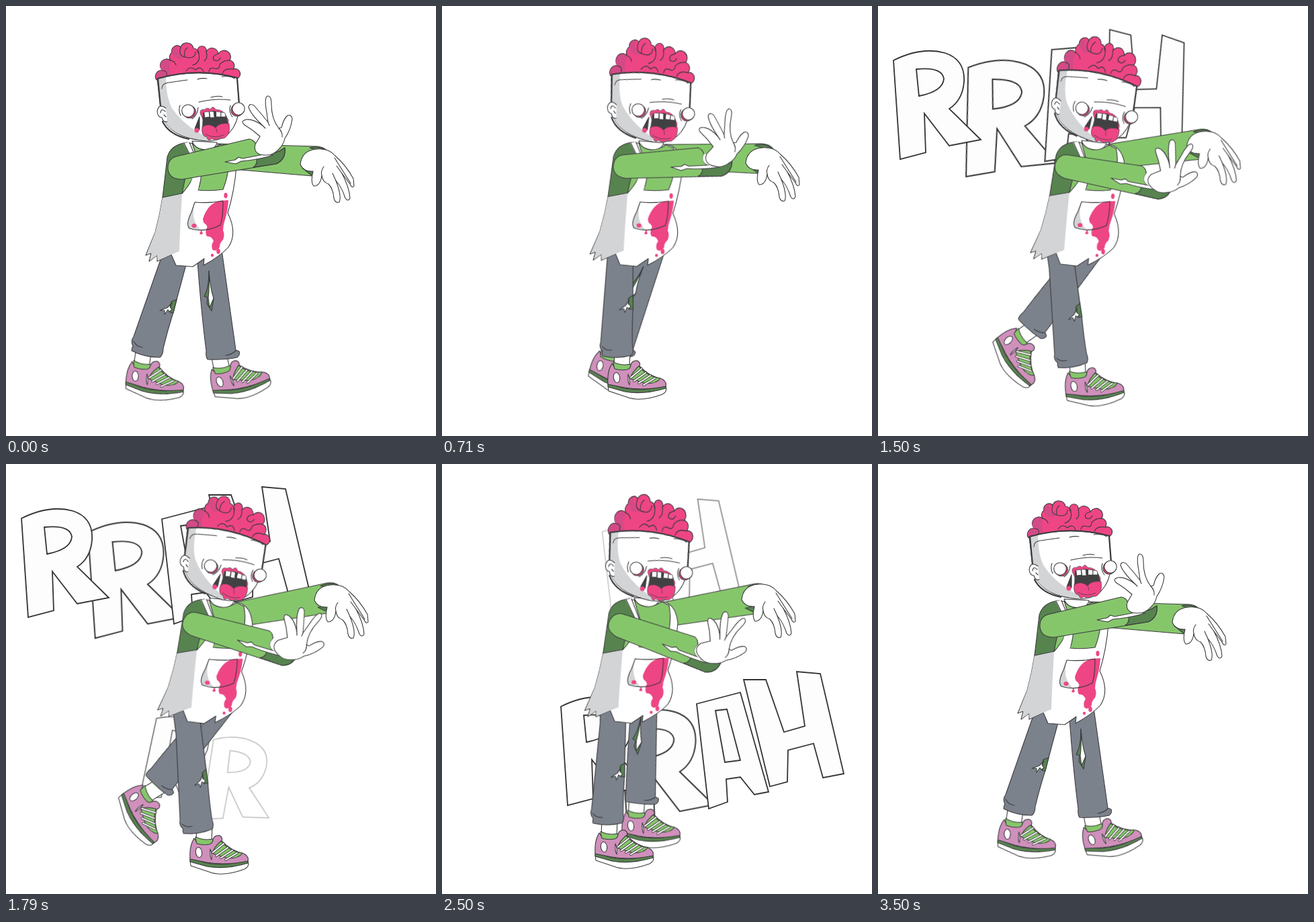
Write an HTML page without scripts that moves like this. It is 640 px wide and 640 px high and loops after 3.57 s.

```html
<!DOCTYPE html>
<html lang="en">
<head>
<meta charset="utf-8">
<title>Walking zombie</title>
<style>
html, body { margin: 0; height: 100%; overflow: hidden; background: #fff; }
svg { display: block; width: 100vw; height: 100vh; }
svg { fill: none; stroke: #3b3b3d; stroke-width: 1.1; stroke-linejoin: round; stroke-linecap: round; }
.white { fill: #fff; }
.green { fill: #86c66b; }
.moss { fill: #57834f; }
.slate { fill: #7c828c; }
.shade { fill: #d2d4d6; }
.pink { fill: #ee4585; }
.rose { fill: #d24a86; }
.lilac { fill: #cf90bb; }
.dark { fill: #414143; }
.flat { stroke: none; }

/* Each part holds six poses, a to f; one cycle walks through them at 14 fps. */
.p { transform: var(--a); transform-origin: var(--o, 0 0); animation: walk 3.57s -5ms infinite; --a: translate(0, 0) rotate(0deg); }
@keyframes walk {
  0% { transform: var(--a); animation-timing-function: steps(10); }
  20% { transform: var(--b); animation-timing-function: steps(6); }
  32% { transform: var(--c); animation-timing-function: steps(9); }
  50% { transform: var(--d); animation-timing-function: steps(10); }
  70% { transform: var(--e); animation-timing-function: steps(8); }
  86% { transform: var(--f); animation-timing-function: steps(6); }
  98%, 100% { transform: var(--a); }
}
#torso { --o: 250px 385px;
  --b: translate(12px, -1px) rotate(1.2deg); --c: translate(20px, -1px) rotate(2deg);
  --d: translate(17px, -3px) rotate(2.7deg); --e: translate(4px, -3px) rotate(1.6deg);
  --f: translate(0, 0) rotate(0deg); }
#head { --o: 308px 154px;
  --b: translate(21px, 3px) rotate(6.7deg); --c: translate(31px, 4px) rotate(11.3deg);
  --d: translate(33px, 4px) rotate(12.8deg); --e: translate(18px, 4px) rotate(7.4deg);
  --f: translate(1px, 1px) rotate(.4deg); }
#brain { --o: 285px 108px; --a: scale(1, 1);
  --b: scale(1, 1.12); --c: scale(1, 1.2); --d: scale(1, 1.09); --e: scale(1, 1.18); --f: scale(1, 1.12); }
#arm { --o: 257px 241px;
  --b: translate(14px, -2px) rotate(8deg); --c: translate(23px, -1px) rotate(14.8deg);
  --d: translate(22px, -3px) rotate(27.5deg); --e: translate(7px, -1px) rotate(31deg);
  --f: translate(0, 0) rotate(9deg); }
#hand { --o: 390px 212px;
  --b: translate(5px, 0) rotate(4deg); --c: translate(6px, 3px) rotate(18deg);
  --d: translate(7px, 3px) rotate(16deg); --e: translate(2px, 0) rotate(15deg);
  --f: translate(1px, 0) rotate(1deg); }
#farArm { --o: 320px 226px;
  --b: translate(14px, 1px) rotate(-2deg); --c: translate(22px, 1px) rotate(-7.5deg);
  --d: translate(23px, 1px) rotate(-13.5deg); --e: translate(10px, 1px) rotate(-13deg);
  --f: translate(0, 1px) rotate(-5deg); }
#farHand {
  --b: translate(14px, -2px) rotate(0deg); --c: translate(22px, -18px) rotate(0deg);
  --d: translate(21px, -33px) rotate(0deg); --e: translate(8px, -34px) rotate(0deg);
  --f: translate(0, -13px) rotate(0deg); }
#leg { --o: 210px 517px;
  --b: translate(52px, 2px) rotate(-14.8deg); --c: translate(86px, 1px) rotate(-24deg);
  --d: translate(77px, 28px) rotate(-22deg); --e: translate(38px, 16px) rotate(-13.6deg);
  --f: translate(23px, 7px) rotate(-8.5deg); }
#farLeg { --o: 322px 517px;
  --b: translate(-58px, -10px) rotate(26deg); --c: translate(-90px, -39px) rotate(43deg);
  --d: translate(-92px, -44px) rotate(46deg); --e: translate(-25px, -20px) rotate(9deg);
  --f: translate(16px, -22px) rotate(-6deg); }
#foot { --a: translate(222px, 557px) rotate(6deg);
  --b: translate(290px, 556px) rotate(0deg); --c: translate(328px, 548px) rotate(-12deg);
  --d: translate(317px, 581px) rotate(0deg); --e: translate(271px, 573px) rotate(0deg);
  --f: translate(251px, 563px) rotate(0deg); }
#farFoot { --a: translate(348px, 555px) rotate(-14deg);
  --b: translate(263px, 547px) rotate(17deg); --c: translate(216px, 525px) rotate(48deg);
  --d: translate(205px, 522px) rotate(56deg); --e: translate(311px, 542px) rotate(1deg);
  --f: translate(367px, 531px) rotate(-9deg); }

/* Letters pop in one after another, settle, shrink and fade. */
.l { fill: #fdfdfd; stroke: #333; stroke-width: 1.8; stroke-linejoin: miter; opacity: 0;
  transform-box: fill-box; transform-origin: 50% 100%;
  animation: shout 3.57s calc(var(--t) * 1ms + var(--i) * 70ms) linear infinite backwards; }
@keyframes shout {
  0% { opacity: 0; transform: rotate(10deg) scale(.72); }
  4% { opacity: .9; transform: rotate(17deg) scale(.83); }
  6.2% { opacity: 1; transform: rotate(13deg) scale(1.08); }
  11.2%, 25% { opacity: 1; transform: rotate(0deg) scale(1); }
  31% { opacity: 1; transform: rotate(0deg) scale(.91); }
  36.8%, 100% { opacity: 0; transform: rotate(0deg) scale(.87); }
}
</style>
</head>
<body>
<svg viewBox="0 0 640 640" role="img" aria-label="A zombie walks and shouts RRAH">
<defs>
  <path id="r" d="M0,0q42,-21 77,-11q30,10 28,43q-2,27 -22,40l47,46 -47,9 -37,-48 2,58 -38,10zM34,13q38,-4 41,14q-1,19 -37,26z"/>
  <path id="ltrA" d="M379,357L444,340 486,488 465,492 444,466 423,469 425,503 397,513ZM407,367L424,365 444,441 421,444Z"/>
  <path id="ltrH" d="M449,321L482,321 509,399 540,390 528,309 563,312 598,461 567,467 553,416 515,426 514,473 488,480Z"/>
  <g id="shoe">
    <path class="white" d="M-33,-46L-34,-20 -11,-18 -10,-44"/>
    <path class="green" d="M-35,-26Q-22,-20 -10,-23L-8,-12 -33,-12Z"/>
    <path class="white" d="M-43,8L-18,12Q10,17 43,10Q46,18 38,22Q5,34 -15,26L-42,17Z"/>
    <path class="moss" d="M-43,6L-18,13Q10,18 43,9L43,13Q10,23 -18,18L-43,11Z"/>
    <path class="lilac" d="M-37,-24Q-34,-21 -33,-16Q-24,-13 -14,-15Q-9,-17 -9,-22Q-7,-29 1,-28Q6,-25 4,-20Q18,-5 37,-1Q45,3 43,10Q10,17 -18,12L-43,7Q-44,-8 -40,-18Z"/>
    <path class="green" d="M3,-20Q14,-5 35,-2Q30,6 14,6L-9,-1Q-10,-8 3,-20Z"/>
    <path stroke-width="3.6" d="M-9,-3L7,-16M-4,2L13,-10M3,5L20,-6M10,8L27,-2"/>
    <path stroke="#fff" stroke-width="2" d="M-9,-3L7,-16M-4,2L13,-10M3,5L20,-6M10,8L27,-2"/>
    <ellipse class="white" cx="-30" cy="-3" rx="4.6" ry="7.6" transform="rotate(-8 -30 -3)"/>
    <path class="white" d="M-13,-8Q-10,-1 -11,8Q-14,3 -13,-8Z"/>
  </g>
</defs>

<g style="--t:1100">
  <g transform="translate(122 102) scale(1.07)"><use href="#r" class="l" style="--i:1"/></g>
  <g transform="translate(23 81)"><use href="#r" class="l" style="--i:0"/></g>
  <g transform="translate(-147 -275)">
    <use href="#ltrA" class="l" style="--i:2"/>
    <use href="#ltrH" class="l" style="--i:3"/>
  </g>
</g>
<g style="--t:1670">
  <g transform="translate(265 381) scale(1.07)"><use href="#r" class="l" style="--i:1"/></g>
  <g transform="translate(177 361)"><use href="#r" class="l" style="--i:0"/></g>
  <use href="#ltrA" class="l" style="--i:2"/>
  <use href="#ltrH" class="l" style="--i:3"/>
</g>

<g id="farArm" class="p">
  <path class="green" d="M315,205L464,209Q474,210 479,217L456,253 315,241Z"/>
  <path class="moss" d="M452,211Q468,207 479,217L466,216ZM441,241L456,253 458,241Z"/>
</g>
<g id="farHand" class="p">
  <path class="white" d="M438,236Q440,215 462,213Q480,211 490,223Q506,237 517,257L518,268Q515,272 512,265L500,249Q511,270 512,286Q509,292 505,286Q500,270 491,260Q500,283 496,292Q490,294 488,286Q487,272 480,265Q471,262 470,252Q468,268 458,268Q453,262 457,246Q443,247 438,236Z"/>
  <path d="M470,252Q468,246 473,239M491,260L486,249M500,249L492,238M513,264L489,226"/>
</g>

<use id="farFoot" class="p" href="#shoe"/>
<g id="farLeg" class="p">
  <path class="slate" d="M284,342L285,380Q291,460 298,513Q297,522 300,526Q325,527 344,523Q349,519 347,514L342,512 322,370 316,342Z"/>
  <path d="M342,513Q336,519 327,520"/>
  <path class="moss" d="M302,394Q302,420 295,432L300,434 299,443 306,454 309,436Q303,420 302,394Z"/>
  <path class="white" d="M302,395Q304,420 309,435L303,449 301,434Q303,420 302,395Z"/>
</g>
<use id="foot" class="p" href="#shoe"/>
<g id="leg" class="p">
  <path class="slate" d="M241,338L232,372 190,492Q185,499 189,506Q187,509 187,513Q206,523 229,523Q234,519 234,510Q239,488 249,456L254,437 268,385 280,338Z"/>
  <path d="M190,499Q194,507 203,508"/>
  <path class="moss" d="M246,440L254,437 249,457 244,456Z"/>
  <path class="white" d="M229,453L240,449 247,442 244,448 247,452 243,455 241,452 236,459 236,453Z"/>
</g>

<g id="torso" class="p">
  <path class="white" d="M266,204L322,206Q340,211 343,238Q340,276 330,308Q345,338 331,359Q318,373 294,386L295,376 278,388 253,386 246,370 225,380 225,371 213,380 216,368 208,371 222,337Q229,311 233,285Z"/>
  <path class="shade flat" d="M233,285L262,280Q259,330 258,365L246,370 226,379 225,371 214,379 217,367 209,370 222,337Q229,311 233,285Z"/>
  <path class="moss" d="M270,203Q245,206 240,225L233,285 262,279Q273,264 279,232Z"/>
  <path class="green" d="M277,204Q295,222 318,206L329,211Q336,240 323,273Q304,276 286,274Q292,255 290,244Z"/>
  <path class="green" d="M262,279Q280,260 284,235L270,240Z"/>
  <path class="white flat" d="M264,204L272,203Q282,225 290,247Q288,262 286,274L275,263 283,240Z"/>
  <path d="M265,204L280,234M273,203L290,244"/>
  <path class="white" d="M277,201Q281,214 299,214Q313,212 314,203Z"/>
  <path class="white flat" d="M281,292Q302,294 323,290Q323,315 319,326Q296,338 273,331Q267,325 276,307Z"/>
  <path class="shade flat" d="M281,292Q274,320 290,333L273,331Q267,325 276,307Z"/>
  <g class="pink flat">
    <path d="M293,317Q300,294 318,290L331,289Q330,305 326,318Q323,326 323,334Q326,340 323,348Q318,352 318,359Q312,367 307,362Q305,355 309,350Q306,342 300,343Q296,341 298,332Q302,328 294,322Z"/>
    <ellipse cx="327" cy="282" rx="2.6" ry="4"/>
    <ellipse cx="316" cy="365" rx="2.8" ry="4"/>
    <circle cx="307" cy="371" r="2.2"/>
    <ellipse cx="280" cy="327" rx="3.6" ry="3"/>
    <path d="M291,333l2,6q-3,2 -5,0z"/>
  </g>
  <path d="M281,292Q302,294 323,290Q323,315 319,326Q296,338 273,331Q267,325 276,307Z"/>
</g>

<g id="head" class="p">
  <g id="brain" class="p">
    <path class="pink" d="M224,110A9 9 0 0 1 233,96A9 9 0 0 1 245,81A8.5 8.5 0 0 1 247,69A8 8 0 0 1 260,61A10 10 0 0 1 279,63A8 8 0 0 1 287,71A6.6 6.6 0 1 1 298,68A9.5 9.5 0 0 1 316,71A9 9 0 0 1 333,81A8 8 0 0 1 338,94A7 7 0 0 1 344,108Z"/>
    <path class="rose flat" d="M225,109A8 8 0 0 1 233,97A8 8 0 0 1 245,82Q240,95 248,105ZM248,72Q246,64 254,61Q255,72 264,77Q256,82 248,72Z"/>
    <path d="M233,96Q241,96 239,104M245,81Q251,82 253,88M260,61Q256,74 266,76Q282,80 282,68M266,76Q264,66 270,62M287,71Q290,84 278,88M268,97Q274,88 282,95Q290,88 294,98M298,68Q301,78 295,82M316,71Q306,74 309,80Q316,84 319,77M302,98Q303,90 311,93Q318,95 318,87Q325,80 333,81M322,101Q324,92 338,94"/>
  </g>
  <path class="white" d="M225,108Q285,92 344,107L347,152Q345,175 333,188Q321,201 300,201Q242,197 231,160Z"/>
  <path class="shade flat" d="M226,108L238,105Q238,135 247,152Q268,183 310,200Q242,200 231,160Z"/>
  <path stroke-width="2.2" d="M231,160L226,108Q285,91 344,107L347,146M233,172Q243,192 272,198"/>
  <path d="M232,123Q232,115 242,114L270,110M285,109Q292,107 299,108M321,105Q336,104 340,108M287,143Q312,137 334,140M305,136Q314,133 322,135M259,148Q256,155 260,163M286,151Q285,163 277,168M334,148Q331,158 337,165"/>
  <path class="white" d="M238,152Q227,144 225,157Q226,166 232,166Q234,174 240,172"/>
  <path d="M237,157Q231,151 230,159M235,162l3,3"/>
  <circle class="pink" cx="273" cy="157.5" r="9.3"/>
  <circle class="white" cx="271" cy="156" r="9.3"/>
  <circle class="pink" cx="344" cy="155" r="9"/>
  <circle class="white" cx="346" cy="153" r="9.2"/>
  <path class="dark" d="M288,165L288,184 281,183Z"/>
  <ellipse class="pink flat" cx="284" cy="185" rx="3.5" ry="3.5"/>
  <path class="pink" stroke-width=".6" d="M289,160Q288,153 296,154Q300,150 304,154Q308,147 312,154Q324,154 328,165Q333,170 330,176L294,170Z"/>
  <path class="dark flat" d="M292,183L293,159 310,156 328,163 331,178 320,190Z"/>
  <path class="white" stroke-width=".7" d="M295,158l7,-1 1,8 -7,1zM303,157l6,0 1,9 -6,0zM313,157l7,1 0,7 -7,0zM320,158l6,1 1,6 -7,0z"/>
  <path class="pink" stroke-width=".7" d="M292,180Q301,173 312,181Q318,173 332,175Q334,190 328,194Q324,199 319,196Q312,202 306,197Q301,203 299,195Q290,194 292,180Z"/>
  <path stroke-width=".7" d="M312,181Q314,184 314,188M297,191Q310,198 324,192"/>
</g>

<g id="arm" class="p">
  <path class="green" d="M253,224L362,198Q369,199 372,206Q368,220 384,222Q404,220 415,211Q417,228 402,235L262,258Q243,258 241,243Q240,228 253,224Z"/>
  <path class="moss" d="M378,222Q400,222 415,211Q417,228 402,235L368,240Q376,234 372,226Z"/>
  <path class="white" d="M326,232L341,229 346,225 352,227 383,221 398,222Q375,229 350,231L342,235Z"/>
  <path class="white flat" d="M372,206Q368,220 384,222L405,215 392,203Z"/>
  <g id="hand" class="p">
    <path class="white" d="M371,206Q368,217 378,221Q395,225 405,214Q413,207 415,197Q424,184 426,168Q425,161 419,163Q413,168 410,181L406,182Q395,168 395,146Q395,133 389,134Q384,137 388,158L390,173Q378,158 369,148Q362,144 361,151Q365,162 382,178Q368,168 358,169Q348,171 355,177Q367,184 378,194Z"/>
    <path d="M390,173L392,178M382,178L386,182M406,182Q412,188 411,195"/>
  </g>
</g>
</svg>
</body>
</html>
```
